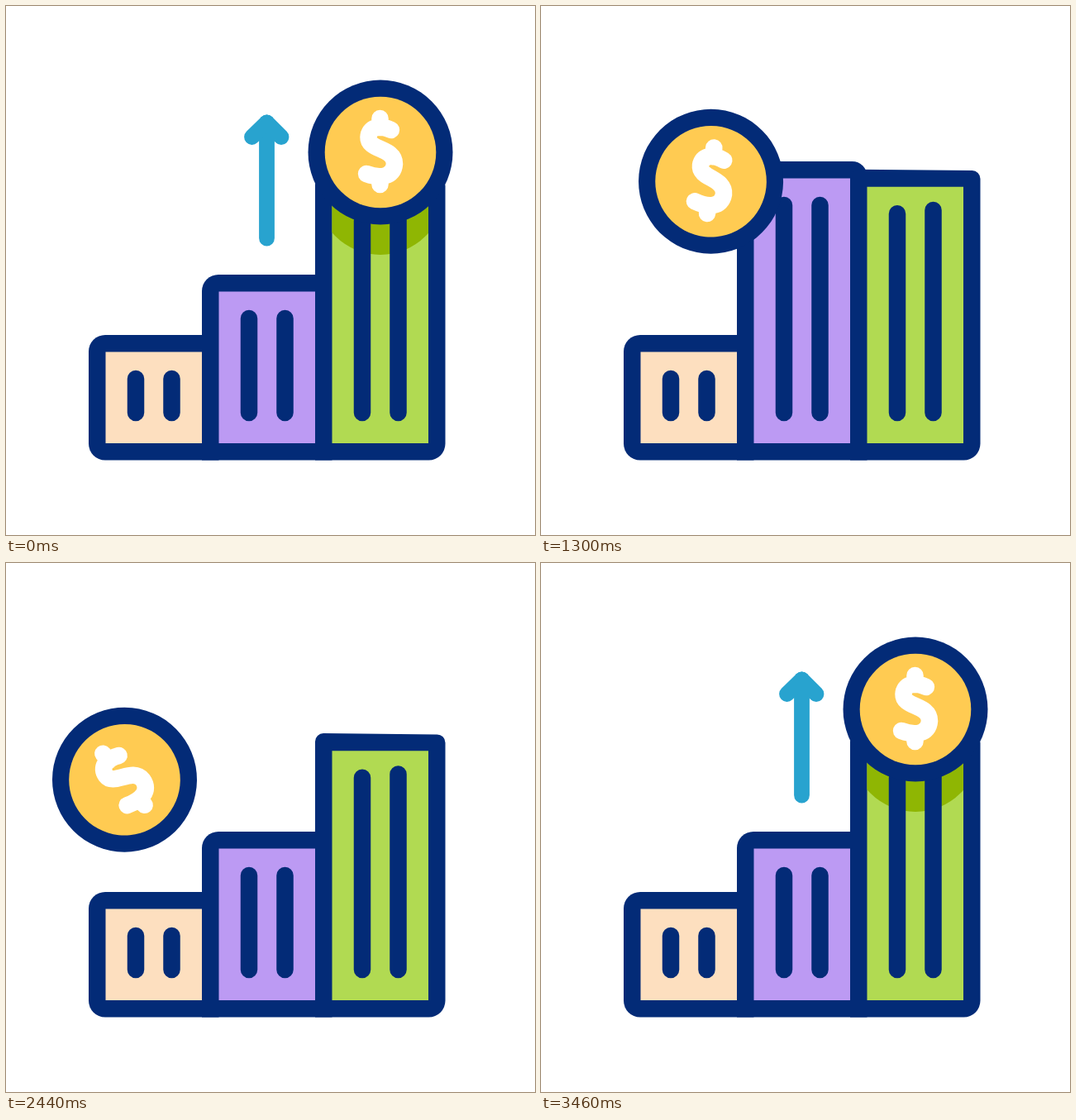
An HTML page with a canvas that plays this animation: 640x640 px, repeating every 3540 ms.

```html
<!DOCTYPE html>
<html lang="en">
<head>
<meta charset="utf-8">
<title>Growth chart</title>
<style>
  html, body { margin: 0; width: 100%; height: 100%; overflow: hidden; background: #fff; }
  canvas { display: block; width: 640px; height: 640px; }
</style>
</head>
<body>
<canvas id="stage" width="640" height="640"></canvas>
<script>
const ctx = document.getElementById('stage').getContext('2d');
const LOOP = 3540, NAVY = '#032b77', BLUE = '#28a3cf', WHITE = '#fff';
const LINE = 20.5, PITCH = 137, BASE = 549.5;

const ramp = (t, from, to) => Math.max(0, Math.min(1, (t - from) / (to - from)));
const smooth = u => u * u * (3 - 2 * u);
const mix = (a, b, u) => a + (b - a) * u;

// Moves by `size` during up0..up1 and back again during down0..down1.
const pulse = (size, up0, up1, down0, down1) =>
  t => size * (smooth(ramp(t, up0, up1)) - smooth(ramp(t, down0, down1)));

const dip = pulse(20, 120, 300, 420, 600), spring = pulse(-68, 450, 900, 950, 1400);
const bars = [
  { fill: '#fddfbf', shade: '#f6b078', rest: 398, radii: [20, 0, 0, 20], skew: 0, depth: 15,
    move: pulse(-128, 1500, 1750, 1850, 2200), shadow: pulse(80, 1350, 1500, 1620, 1820) },
  { fill: '#bc9af3', shade: '#6864f8', rest: 325, radii: [20, 18, 0, 0], skew: 0, depth: 15,
    move: pulse(-139, 780, 1340, 1700, 2150), shadow: pulse(85, 480, 640, 900, 1080) },
  { fill: '#b1da52', shade: '#8fb603', rest: 206, radii: [10, 10, 20, 0], skew: 1.5, depth: 95,
    move: t => dip(t) + spring(t), shadow: pulse(-80, 120, 330, 3080, 3280) }
];

// Each leg runs to the next pose; `arc` is how far its path bows upwards.
const hops = [
  { at: 120, x: 453, y: 177, turn: 0, arc: 97 },
  { at: 580, x: 305, y: 302, turn: -71, arc: -20 },
  { at: 900, x: 296, y: 240, turn: -8, arc: 120 },
  { at: 1480, x: 179, y: 348, turn: 10, arc: -10 },
  { at: 1700, x: 158, y: 237, turn: 25, arc: 32 },
  { at: 2440, x: 143.5, y: 262, turn: -39, arc: 0 },
  { at: 3440, x: -101, y: 480, turn: -194 }
];
const drop = [
  { at: 2660, x: 453, y: -165, turn: -106, arc: 0 },
  { at: 3300, x: 453, y: 177, turn: 0 }
];

function poseAt(poses, t) {
  const next = Math.max(1, poses.findIndex((p, i) => p.at > t || i === poses.length - 1));
  const a = poses[next - 1], b = poses[next];
  const u = ramp(t, a.at, b.at), eased = smooth(u);
  return {
    x: mix(a.x, b.x, eased),
    y: mix(a.y, b.y, u) - 4 * a.arc * u * (1 - u),
    turn: mix(a.turn, b.turn, eased)
  };
}

function stroke(path, color, width = LINE) {
  ctx.lineWidth = width;
  ctx.lineCap = ctx.lineJoin = 'round';
  ctx.strokeStyle = color;
  ctx.stroke(new Path2D(path));
}

function disc(x, y, r, color) {
  ctx.fillStyle = color;
  ctx.beginPath();
  ctx.arc(x, y, r, 0, 2 * Math.PI);
  ctx.fill();
}

function drawBar({ fill, shade, rest, radii, skew, depth, move, shadow }, index, t) {
  const x = 100 + index * PITCH, y = rest + move(t), right = x + PITCH + LINE;
  const corners = [[x, y], [right, y + skew], [right, BASE], [x, BASE]];
  ctx.fillStyle = NAVY;
  ctx.beginPath();
  ctx.moveTo(x, (y + BASE) / 2);
  corners.forEach(([cx, cy], i) => ctx.arcTo(cx, cy, ...corners[(i + 1) % 4], radii[i]));
  ctx.fill();

  const innerTop = y + LINE + skew / 2;
  ctx.save();
  ctx.beginPath();
  ctx.rect(x + LINE, innerTop, PITCH - LINE, BASE - LINE - innerTop);
  ctx.clip();
  ctx.fillStyle = fill;
  ctx.fillRect(x, y, right - x, BASE - y);
  disc(x + 79, y + depth + shadow(t) - 77, 77, shade);
  ctx.restore();

  stroke(`M${x + 57} ${y + 53 + skew / 2}V492M${x + 100.5} ${y + 53 - skew * 2.4}V492`, NAVY);
}

function drawCoin(poses, t) {
  const { x, y, turn } = poseAt(poses, t);
  ctx.save();
  ctx.translate(x, y);
  ctx.rotate(turn * Math.PI / 180);
  disc(0, 0, 87.5, NAVY);
  disc(0, 0, 67.3, '#ffcb52');
  stroke('M13 -27C-2 -34 -14 -30 -14.5 -18C-15 -2 17 -6 17 14C16 30 0 32 -17 26'
    + 'M-.5 -41V-30M-.5 39V30', WHITE);
  ctx.restore();
}

function drawArrow(t) {
  const out = 1 - ramp(t, 120, 430);
  const stem = out || ramp(t, 3140, 3400), head = out || ramp(t, 3260, 3460);
  const [tail, tip] = out ? [mix(141, 281, stem), 141] : [281, mix(281, 141, stem)];
  if (stem) stroke(`M315.5 ${tail}V${tip}`, BLUE, 18.8);
  if (head) {
    const left = ramp(head, 0, .5), right = ramp(head, .5, 1);
    stroke(`M297.5 158.5L${mix(297.5, 315.5, left)} ${mix(158.5, 141, left)}`
      + `l${17.5 * right} ${17.5 * right}`, BLUE, 18.8);
  }
}

function draw(t) {
  ctx.fillStyle = WHITE;
  ctx.fillRect(0, 0, 640, 640);
  bars.forEach((bar, i) => drawBar(bar, i, t));
  drawCoin(hops, t);
  drawCoin(drop, t);
  drawArrow(t);
}

const start = performance.now();
function tick() {
  draw((performance.now() - start) % LOOP);
  requestAnimationFrame(tick);
}
tick();
</script>
</body>
</html>
```
